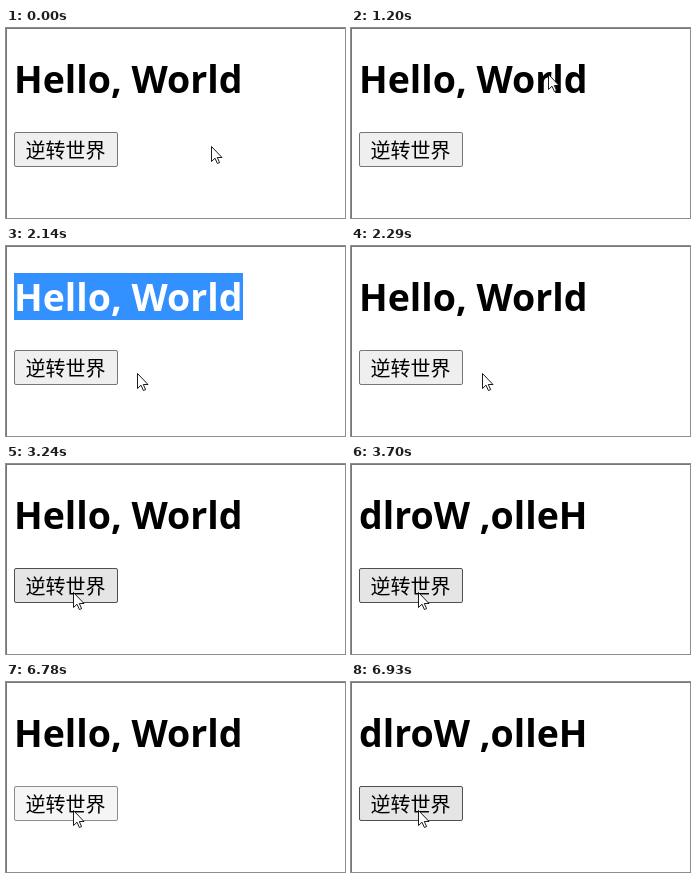
An HTML page that plays this animation: 339x190 px, repeating every 8000 ms.

```html
<!DOCTYPE html>
<html lang="zh-CN">
<head>
<meta charset="utf-8">
<title>Hello, World</title>
<style>
html, body { margin: 0; width: 100%; height: 100%; overflow: hidden; background: #fff; }
svg { display: block; width: 339px; height: 190px; }
svg * { animation: 8s step-end infinite; }
.title { font: 700 37.5px "Open Sans", "Noto Sans", sans-serif; white-space: pre; }
.label { font: 300 20px "Noto Sans CJK SC", "Noto Sans CJK", sans-serif; }
.forward { animation-name: forward; }
.backward { opacity: 0; animation-name: backward; }
.selection { clip-path: inset(0 0 0 229px); animation-name: select; }
.button { fill: #efefef; stroke: #767676; animation-name: button; }
.cursor { animation-name: move; }

@keyframes forward {
  0%, 63.625% { opacity: 1; }
  46.25%, 86.625%, 100% { opacity: 0; }
}
@keyframes backward {
  0%, 63.625% { opacity: 0; }
  46.25%, 86.625%, 100% { opacity: 1; }
}
@keyframes select {
  0%, 28.625%, 100% { clip-path: inset(0 0 0 229px); }
  16.875% { clip-path: inset(0 0 0 94px); }
  18.5% { clip-path: inset(0); }
}
/* idle, hover, then three presses */
@keyframes button {
  0% { fill: #efefef; stroke: #767676; }
  37.5%, 46.25%, 63.625%, 86.625%, 100% { fill: #e5e5e5; stroke: #4f4f4f; }
  44.375%, 60.25%, 84.75% { fill: #f5f5f5; stroke: #8d8d8d; }
}
@keyframes move {
  0% { transform: translate(205px, 118px); }
  6.25% { transform: translate(229px, 89px); }
  8.125% { transform: translate(239px, 67px); }
  9.625% { transform: translate(246px, 48px); }
  11.125% { transform: translate(248px, 40px); }
  15% { transform: translate(197px, 46px); }
  16.875% { transform: translate(100px, 50px); }
  18.5% { transform: translate(16px, 52px); }
  22.25% { transform: translate(11px, 48px); }
  23.75% { transform: translate(44px, 66px); }
  25.25% { transform: translate(100px, 100px); }
  26.75% { transform: translate(131px, 127px); }
  35.625% { transform: translate(127px, 127px); }
  37.5% { transform: translate(104px, 130px); }
  39% { transform: translate(78px, 129px); }
  40.5%, 100% { transform: translate(67px, 128px); }
}
</style>
</head>
<body>
<svg viewBox="0 0 339 190">
  <path d="M0 .5H339M.5 0V190" fill="none" stroke="#777"/>
  <text class="title forward" x="8" y="65">Hello, World</text>
  <text class="title backward" x="8" y="65">dlroW ,olleH</text>
  <g class="selection">
    <rect x="8" y="27" width="229" height="47" fill="#3390ff"/>
    <text class="title" x="8" y="65" fill="#fff">Hello, World</text>
  </g>
  <rect class="button" x="8.5" y="104.5" width="103" height="34" rx="1.5"/>
  <text class="label" x="19.5" y="130">逆转世界</text>
  <path class="cursor" d="M.5 .5V15.5L4 12.2L6.4 17.5L8.6 16.6L6.3 11.5H11Z" fill="#fff" stroke="#000" stroke-width=".9"/>
</svg>
</body>
</html>
```
